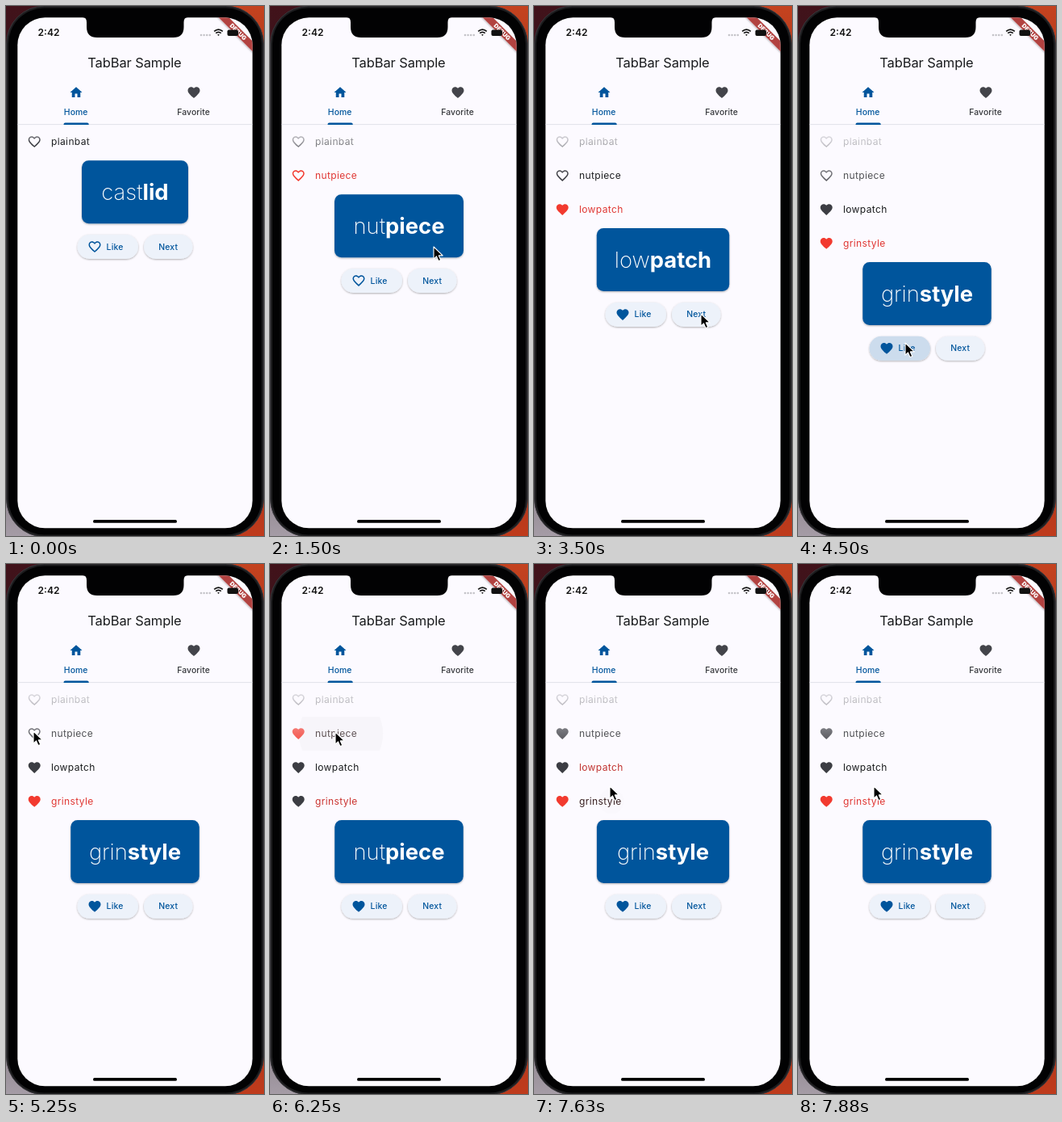
An HTML page that plays this animation: 320 px wide and 656 px high, repeating every 8 s.

```html
<!DOCTYPE html>
<html lang="en">
<head>
<meta charset="utf-8">
<title>TabBar Sample</title>
<style>
  html, body { margin: 0; width: 100%; height: 100%; overflow: hidden; background: #000; }
  svg { display: block; width: 100%; height: 100%; }
  text { font-family: Inter, Roboto, sans-serif; }
  .label { font-size: 10.4px; font-weight: 500; letter-spacing: .08px; }
  .button { letter-spacing: .2px; }
  .row { font-size: 12px; letter-spacing: .37px; }
  .mid { text-anchor: middle; }
  .blue { fill: #00559c; }
  .word { font-size: 27.4px; fill: #fff; }
  .thin { font-weight: 200; }
  .bold { font-weight: 700; }
</style>
</head>
<body>
<svg viewBox="0 0 320 656" preserveAspectRatio="none">
  <defs>
    <linearGradient id="left" x2="0" y2="1">
      <stop stop-color="#41121a"/><stop offset=".5" stop-color="#2a2022"/><stop offset="1" stop-color="#a59ca6"/>
    </linearGradient>
    <linearGradient id="right" x2="0" y2="1">
      <stop stop-color="#c4421f"/><stop offset=".5" stop-color="#7c281a"/><stop offset="1" stop-color="#bf3b1c"/>
    </linearGradient>
    <linearGradient id="fade" gradientUnits="userSpaceOnUse" x1="0" x2="0" y1="147" y2="168">
      <stop stop-color="#000"/><stop offset="1" stop-color="#fff"/>
    </linearGradient>
    <mask id="fadeMask" maskUnits="userSpaceOnUse" x="0" y="147" width="320" height="400">
      <rect y="147" width="320" height="400" fill="url(#fade)"/>
    </mask>
    <filter id="shadow" x="-10%" y="-20%" width="120%" height="150%">
      <feDropShadow dx="0" dy=".9" stdDeviation=".9" flood-color="#000" flood-opacity=".32"/>
    </filter>
    <clipPath id="screen"><rect x="14.3" y="14.3" width="291.4" height="632" rx="34"/></clipPath>
    <clipPath id="inkClip"><rect id="inkBox" x="14" width="292" height="42"/></clipPath>
    <path id="heart" d="M12 21.35l-1.45-1.32C5.4 15.36 2 12.28 2 8.5 2 5.42 4.42 3 7.5 3c1.74 0 3.41.81 4.5 2.09C13.09 3.81 14.76 3 16.5 3 19.58 3 22 5.42 22 8.5c0 3.78-3.4 6.86-8.55 11.54z"/>
    <path id="outline" fill-rule="evenodd" d="M12 21.35l-1.45-1.32C5.4 15.36 2 12.28 2 8.5 2 5.42 4.42 3 7.5 3c1.74 0 3.41.81 4.5 2.09C13.09 3.81 14.76 3 16.5 3 19.58 3 22 5.42 22 8.5c0 3.78-3.4 6.86-8.55 11.54zM12.1 18.55l-.1.1-.1-.1C7.14 14.24 4 11.39 4 8.5 4 6.5 5.5 5 7.5 5c1.54 0 3.04.99 3.57 2.36h1.87C13.46 5.99 14.96 5 16.5 5c2 0 3.5 1.5 3.5 3.5 0 2.89-3.14 5.74-7.9 10.05z"/>
  </defs>

  <rect width="160" height="656" fill="url(#left)"/>
  <rect x="160" width="160" height="656" fill="url(#right)"/>
  <rect x=".5" y="0" width="319" height="657" rx="47" fill="#1c1c1e" stroke="#3a393d"/>
  <rect x="3" y="2.5" width="314" height="652" rx="44.5" fill="#020203"/>
  <rect x="14.3" y="14.3" width="291.4" height="632" rx="34" fill="#fcfaff"/>

  <g clip-path="url(#screen)">
    <text class="mid" x="159.4" y="76.2" font-size="16.5" letter-spacing="-.1" fill="#1a1c1e">TabBar Sample</text>
    <path class="blue" transform="translate(78 98) scale(.75)" d="M10 20v-6h4v6h5v-8h3L12 3 2 12h3v8z"/>
    <use href="#heart" transform="translate(224 98) scale(.75)" fill="#43444a"/>
    <text class="label mid blue" x="86.7" y="134.7">Home</text>
    <text class="label mid" x="232.6" y="134.7" fill="#35373b">Favorite</text>
    <rect x="14" y="146.2" width="292" height=".9" fill="#dfdfe6"/>
    <path class="blue" d="M71.5 147v-.4q0-2 2-2h27.2q2 0 2 2v.4z"/>

    <g clip-path="url(#inkClip)"><circle id="ink" fill="#000"/></g>
    <g id="rows" mask="url(#fadeMask)"></g>
    <g id="panel">
      <rect id="card" class="blue" y="191.2" height="78" rx="8.5" filter="url(#shadow)"/>
      <text id="word" class="word mid" x="160" y="239.8"><tspan class="thin"></tspan><tspan class="bold"></tspan></text>
      <rect x="88.5" y="283" width="75.5" height="30" rx="15" fill="#edf2fa" filter="url(#shadow)"/>
      <rect id="likeInk" class="blue" x="88.5" y="283" width="75.5" height="30" rx="15"/>
      <use id="likeIcon" class="blue" transform="translate(101 289) scale(.75)"/>
      <text class="label button blue" x="124.6" y="301.6">Like</text>
      <rect x="171" y="283" width="60.5" height="30" rx="15" fill="#edf2fa" filter="url(#shadow)"/>
      <rect id="nextInk" class="blue" x="171" y="283" width="60.5" height="30" rx="15"/>
      <text class="label button mid blue" x="201.2" y="301.6">Next</text>
    </g>

    <g transform="translate(306 14) rotate(45)">
      <rect x="-32" y="21" width="64" height="9" fill="#b2433f" filter="url(#shadow)"/>
      <text class="mid" y="28.2" font-size="7.4" font-weight="900" fill="#fff">DEBUG</text>
    </g>
  </g>

  <path d="M95 14q5 0 5 6v6q0 13 13 13h94.5q13 0 13-13v-6q0-6 5-6z" fill="#020203"/>
  <text class="mid" x="53" y="37" font-size="12" font-weight="600" fill="#111">2:42</text>
  <g fill="#c4c3c8">
    <circle cx="242" cy="36" r="1.3"/><circle cx="245.6" cy="36" r="1.3"/><circle cx="249.2" cy="36" r="1.3"/><circle cx="252.8" cy="36" r="1.3"/>
  </g>
  <g fill="none" stroke="#111" stroke-width="1.7">
    <path d="M258.2 31.4q5.3-4.6 10.6 0M260.2 33.7q3.3-2.8 6.6 0"/>
    <path d="M263.5 37l-1.4-1.5q1.4-1 2.8 0z" fill="#111" stroke="none"/>
  </g>
  <rect x="274.5" y="29.5" width="13.5" height="7.4" rx="2" fill="#111"/>
  <rect x="288.8" y="32" width="1" height="2.6" rx=".5" fill="#4a2a2a"/>
  <rect x="108" y="636" width="104" height="3.8" rx="1.9" fill="#000"/>

  <path id="cursor" d="M0 0v15.2l3.5-3.3 2.5 5.7 2.8-1.2-2.5-5.5h4.9z" fill="#000" stroke="#fff" stroke-width="1.1" stroke-linejoin="round"/>
</svg>
<script>
const LOOP = 8000, ROW = 41.94, TOP = 147, FADE = 200;
const $ = id => document.getElementById(id);
const NS = "http://www.w3.org/2000/svg";
const DARK = [26, 28, 30], RED = [224, 56, 52];

const WORDS = {
  castlid: ["cast", "lid", 132],
  plainbat: ["plain", "bat", 160],
  nutpiece: ["nut", "piece", 160],
  lowpatch: ["low", "patch", 164.5],
  grinstyle: ["grin", "style", 159.5],
};
const LIST = ["plainbat", "nutpiece", "lowpatch", "grinstyle"];

// when each word joins the list, gets liked, or becomes current
const ADDED = { plainbat: 0, nutpiece: 1000, lowpatch: 2120, grinstyle: 3760 };
const LIKED = { lowpatch: 2950, grinstyle: 4350, nutpiece: 5450 };
const PICKS = [
  [-1000, "castlid"], [1000, "nutpiece"], [2120, "lowpatch"], [3760, "grinstyle"],
  [6230, "nutpiece"], [6920, "lowpatch"], [7600, "grinstyle"],
];
const NEXT_TAPS = [960, 2080, 3720], LIKE_TAPS = [2900, 4310];
const ROW_TAPS = [[6110, 1, 88], [6900, 2, 84], [7520, 3, 96]];

const PATH = [
  [130, 330, 420], [850, 203, 298], [1500, 203, 298], [2000, 203, 323], [2350, 203, 323],
  [2850, 128, 380], [3130, 128, 380], [3450, 207, 381], [3850, 207, 381], [4300, 133, 417],
  [4600, 133, 417], [5250, 34, 207], [5750, 34, 207], [6050, 81, 208], [6450, 81, 208],
  [6800, 80, 250], [6950, 80, 250], [7120, 81, 273], [7380, 94, 275],
];

const clamp = v => Math.min(1, Math.max(0, v));
const smooth = v => v * v * (3 - 2 * v);
const lerp = (a, b, k) => a + (b - a) * k;
const mix = (a, b, k) => `rgb(${a.map((v, i) => Math.round(lerp(v, b[i], k)))})`;
const set = (el, attrs) => { for (const k in attrs) el.setAttribute(k, attrs[k]); };

const rows = LIST.map((name, i) => {
  const g = document.createElementNS(NS, "g");
  const icon = document.createElementNS(NS, "use");
  const text = document.createElementNS(NS, "text");
  set(icon, { transform: `translate(26.2 ${159 + i * ROW}) scale(.75)` });
  set(text, { x: 56, y: 172.2 + i * ROW, class: "row" });
  text.textContent = name;
  g.append(icon, text);
  $("rows").append(g);
  return { name, g, icon, text };
});
const [thin, bold] = $("word").children;

const iconFor = (name, t) => t >= LIKED[name] ? "#heart" : "#outline";

function cursorAt(t) {
  const i = PATH.findIndex(p => p[0] > t);
  if (i === 0) return PATH[0].slice(1);
  if (i < 0) return PATH[PATH.length - 1].slice(1);
  const [t0, x0, y0] = PATH[i - 1], [t1, x1, y1] = PATH[i];
  const k = smooth((t - t0) / (t1 - t0));
  return [lerp(x0, x1, k), lerp(y0, y1, k)];
}

function tapGlow(taps, t) {
  return Math.max(...taps.map(s => t < s ? 0 : .14 * clamp((t - s) / 100) * clamp((s + 420 - t) / 150)));
}

function drawInk(t) {
  const tap = ROW_TAPS.find(([s]) => t >= s && t < s + 340);
  if (!tap) return set($("ink"), { r: 0 });
  const [start, row, x] = tap, age = t - start, k = clamp(age / FADE);
  set($("inkBox"), { y: TOP + row * ROW });
  set($("ink"), {
    cx: x, cy: TOP + (row + .5) * ROW, r: 300 * k ** 5,
    opacity: .1 * k ** 4.5 * clamp((340 - age) / 100),
  });
}

function draw(t) {
  const n = PICKS.filter(p => p[0] <= t).length - 1;
  const [since, current] = PICKS[n], last = n ? PICKS[n - 1] : PICKS[0];
  const k = clamp((t - since) / FADE);
  const count = LIST.filter(w => ADDED[w] <= t).length;

  rows.forEach(({ name, g, icon, text }) => {
    const on = name === current, fresh = ADDED[name] === since;
    const red = on ? (fresh ? 1 : k) : name === last[1] ? 1 - k : 0;
    g.style.display = ADDED[name] <= t ? "" : "none";
    set(icon, { href: iconFor(name, t), fill: on ? "#f23a2f" : "#3c3d43" });
    set(text, { fill: mix(DARK, RED, red) });
  });
  set($("fade"), { y2: TOP + count * ROW / 2 });
  set($("panel"), { transform: `translate(0 ${(count - 1) * ROW})` });

  const [a, b, w] = WORDS[current];
  const width = lerp(WORDS[last[1]][2], w, smooth(k));
  thin.textContent = a;
  bold.textContent = b;
  set($("card"), { x: 160 - width / 2, width });
  set($("likeIcon"), { href: iconFor(current, t) });
  set($("likeInk"), { opacity: tapGlow(LIKE_TAPS, t) });
  set($("nextInk"), { opacity: tapGlow(NEXT_TAPS, t) });
  drawInk(t);
  set($("cursor"), { transform: `translate(${cursorAt(t)})` });
}

const begin = performance.now();
function tick() {
  draw((performance.now() - begin) % LOOP);
  requestAnimationFrame(tick);
}
tick();
</script>
</body>
</html>
```
